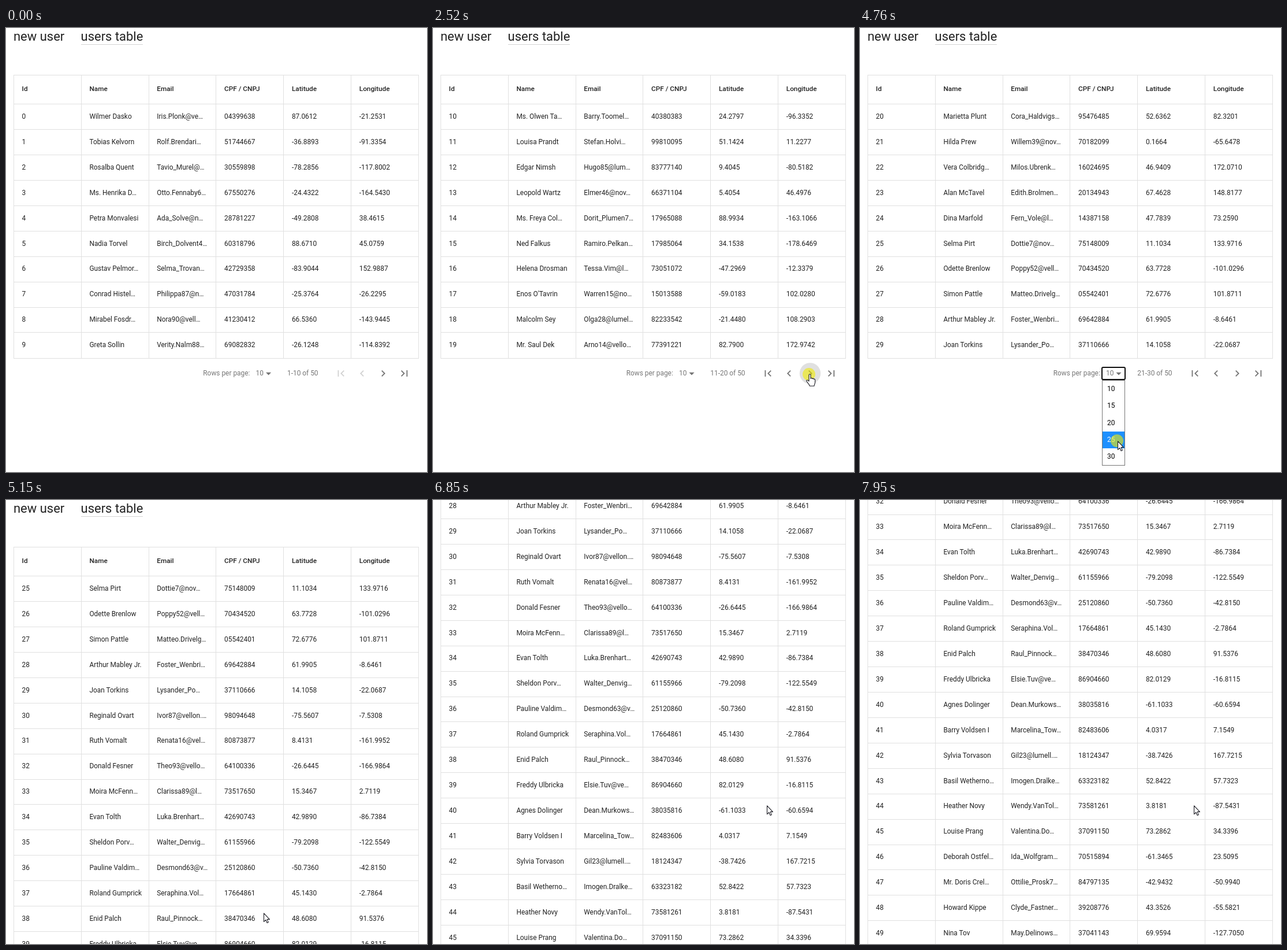
Recreate the animation shown at these times as an HTML page. Size 729 px wide and 768 px high, loop 8 s.

```html
<!DOCTYPE html>
<html lang="en">
<head>
<meta charset="utf-8">
<title>Users table</title>
<style>
html, body { margin: 0; width: 729px; height: 768px; overflow: hidden; background: #fff; }
body { position: relative; font: 11.9px Roboto, Arial, sans-serif; color: rgba(0,0,0,.87); }
div, span, svg { position: absolute; white-space: nowrap; }
svg { overflow: visible; left: 0; top: 0; }
#page { left: 0; top: 0; width: 729px; height: 1300px; }
.tab { top: 0; height: 28px; line-height: 30px; font-size: 21.96px; }
.tab.on { border-bottom: 1px solid #d4d4d4; }
.line { background: #e0e0e0; }
.head { font-weight: 500; font-size: 11.8px; }
#foot { left: 0; top: 0; color: rgba(0,0,0,.54); }
#foot span { top: 586.4px; line-height: 22px; }
#box { left: 418px; top: 586px; width: 38px; height: 19px; border: 2px solid #101010; border-radius: 3px; }
#list { left: 419px; top: 609px; width: 38px; height: 146px; border: 1px solid #767676; background: #fff; color: #000; }
#list div { left: 0; width: 30px; padding-left: 8px; height: 29.3px; line-height: 29.3px; }
#list .pick { background: #1e90ff; color: #fff; }
</style>
</head>
<body>
<div id="page">
  <div class="tab" style="left:13px">new user</div>
  <div class="tab on" style="left:129.6px">users table</div>
  <div id="tables"></div>
  <div id="foot">
    <span id="label">Rows per page:</span><span id="size">10</span>
    <span id="range" style="right:-540.5px"></span>
    <svg width="1" height="1">
      <circle id="hover" cx="653" cy="597.4" r="18.2" fill="#e0e0e0"/>
      <path id="caret" d="M7 10l5 5 5-5z" fill="#757575"/>
      <g id="icons" fill="#000"></g>
    </svg>
  </div>
  <div id="box"></div>
  <div id="list"></div>
</div>
<svg width="729" height="768">
  <circle id="disc" r="11" fill="rgba(240,235,0,.6)"/>
  <g id="cursor" fill="#fff" stroke="#1c1c24" stroke-width="1.1" stroke-linejoin="round">
    <path id="arrow" d="M.5 .8V15.4L3.8 12.3 6 17.4 8.3 16.4 6.1 11.4H10.4Z"/>
    <path id="hand" transform="translate(-6 -1)" d="M5 13V2.2C5 .2 8 .2 8 2.2V8.5C8.3 7 10.6 7.1 10.8 8.9 11.2 7.6 13.2 7.9 13.4 9.6 14 8.8 15.6 9 15.6 10.8V15C15.6 17.5 14 19 14 21.3H6.2C6 19.5 4.8 18 3.4 16.4L.8 12.8C.2 11.3 2 10.4 3.2 11.4Z"/>
  </g>
</svg>
<script>
const users = `Wilmer Dasko|Iris.Plonk@ve…|04399638|87.0612|-21.2531
Tobias Kelvorn|Rolf.Brendari…|51744667|-36.8893|-91.3354
Rosalba Quent|Tavio_Murel@…|30559898|-78.2856|-117.8002
Ms. Henrika D…|Otto.Fennaby6…|67550276|-24.4322|-164.5430
Petra Monvalesi|Ada_Solve@n…|28781227|-49.2808|38.4615
Nadia Torvel|Birch_Dolvent4…|60318796|88.6710|45.0759
Gustav Pelmor…|Selma_Trovan…|42729358|-83.9044|152.9887
Conrad Histel…|Philippa87@n…|47031784|-25.3764|-26.2295
Mirabel Fosdr…|Nora90@vell…|41230412|66.5360|-143.9445
Greta Sollin|Verity.Nalm88…|69082832|-26.1248|-114.8392
Ms. Olwen Ta…|Barry.Toomel…|40380383|24.2797|-96.3352
Louisa Prandt|Stefan.Holvi…|99810095|51.1424|11.2277
Edgar Nimsh|Hugo85@lum…|83777140|9.4045|-80.5182
Leopold Wartz|Elmer46@nov…|66371104|5.4054|46.4976
Ms. Freya Col…|Dorit_Plumen7…|17965088|88.9934|-163.1066
Ned Falkus|Ramiro.Pelkan…|17985064|34.1538|-178.6469
Helena Drosman|Tessa.Vim@l…|73051072|-47.2969|-12.3379
Enos O'Tavrin|Warren15@no…|15013588|-59.0183|102.0280
Malcolm Sey|Olga28@lumel…|82233542|-21.4480|108.2903
Mr. Saul Dek|Arno14@vello…|77391221|82.7900|172.9742
Marietta Plunt|Cora_Haldvigs…|95476485|52.6362|82.3201
Hilda Prew|Willem39@nov…|70182099|0.1664|-65.6478
Vera Colbridg…|Milos.Ubrenk…|16024695|46.9409|172.0710
Alan McTavel|Edith.Brolmen…|20134943|67.4628|148.8177
Dina Marfold|Fern_Vole@l…|14387158|47.7839|73.2590
Selma Pirt|Dottie7@nov…|75148009|11.1034|133.9716
Odette Brenlow|Poppy52@vell…|70434520|63.7728|-101.0296
Simon Pattle|Matteo.Drivelg…|05542401|72.6776|101.8711
Arthur Mabley Jr.|Foster_Wenbri…|69642884|61.9905|-8.6461
Joan Torkins|Lysander_Po…|37110666|14.1058|-22.0687
Reginald Ovart|Ivor87@vellon.…|98094648|-75.5607|-7.5308
Ruth Vomalt|Renata16@vel…|80873877|8.4131|-161.9952
Donald Fesner|Theo93@vello…|64100336|-26.6445|-166.9864
Moira McFenn…|Clarissa89@l…|73517650|15.3467|2.7119
Evan Tolth|Luka.Brenhart…|42690743|42.9890|-86.7384
Sheldon Porv…|Walter_Denvig…|61155966|-79.2098|-122.5549
Pauline Valdim…|Desmond63@v…|25120860|-50.7360|-42.8150
Roland Gumprick|Seraphina.Vol…|17664861|45.1430|-2.7864
Enid Palch|Raul_Pinnock…|38470346|48.6080|91.5376
Freddy Ulbricka|Elsie.Tuv@ve…|86904660|82.0129|-16.8115
Agnes Dolinger|Dean.Murkows…|38035816|-61.1033|-60.6594
Barry Voldsen I|Marcelina_Tow…|82483606|4.0317|7.1549
Sylvia Torvason|Gil23@lumell.…|18124347|-38.7426|167.7215
Basil Wetherno…|Imogen.Dralke…|63323182|52.8422|57.7323
Heather Novy|Wendy.VanTol…|73581261|3.8181|-87.5431
Louise Prang|Valentina.Do…|37091150|73.2862|34.3396
Deborah Ostfel…|Ida_Wolfgram…|70515894|-61.3465|23.5095
Mr. Doris Crel…|Ottilie_Prosk7…|84797135|-42.9432|-50.9940
Howard Kippe|Clyde_Fastner…|39208776|43.3526|-55.5821
Nina Tov|May.Delinows…|37041143|69.9594|-127.7050`
  .split('\n').map((row, i) => [i, ...row.split('|')]);
const titles = ['Id', 'Name', 'Email', 'CPF / CNPJ', 'Latitude', 'Longitude'];

const LOOP = 8000, LEFT = 13, TOP = 81, BODY = 131.2, ROW = 43.92, COL = 116.83, SCROLL = 91.6;
const $ = id => document.getElementById(id);
const show = (el, on) => { el.style.display = on ? '' : 'none'; };

function add(parent, css, text = '', cls = '') {
  const el = document.createElement('div');
  el.style.cssText = css;
  el.textContent = text;
  el.className = cls;
  parent.append(el);
  return el;
}

function addCells(parent, cells, top, height, cls) {
  cells.forEach((text, c) => add(parent,
    `left:${LEFT + c * COL + 14.6}px;top:${top}px;line-height:${height}px`, text, cls));
}

function makeTable(from, to) {
  const table = add($('tables'), 'left:0;top:0');
  const count = to - from, bottom = Math.round(BODY + count * ROW + .7);
  const line = (x, y, w, h) =>
    add(table, `left:${x}px;top:${y}px;width:${w}px;height:${h}px`, '', 'line');
  for (let c = 0; c <= 6; c++) line(Math.round(LEFT + c * COL - .1), TOP, 1, bottom - TOP);
  line(LEFT, TOP, 702, 1);
  addCells(table, titles, TOP, 49.6, 'head');
  for (let r = 0; r <= count; r++) {
    line(LEFT, r < count ? BODY + r * ROW : bottom, 702, 1);
    if (r < count) addCells(table, users[from + r], BODY + r * ROW + .75, ROW, '');
  }
  return table;
}

const tables = [[0, 10], [10, 20], [20, 30], [25, 50]].map(p => makeTable(...p));

const icons = [
  'M18.41 16.59L13.82 12l4.59-4.59L17 6l-6 6 6 6zM6 6h2v12H6z',
  'M15.41 7.41L14 6l-6 6 6 6 1.41-1.41L10.83 12z',
  'M10 6L8.59 7.41 13.17 12l-4.58 4.59L10 18l6-6z',
  'M5.59 7.41L10.18 12l-4.59 4.59L7 18l6-6-6-6zM16 6h2v12h-2z'
].map((d, i) => {
  const path = document.createElementNS('http://www.w3.org/2000/svg', 'path');
  path.setAttribute('d', d);
  path.setAttribute('transform', `translate(${569 + i * 36.6} 586.5) scale(.915)`);
  $('icons').append(path);
  return path;
});

const options = [10, 15, 20, 25, 30].map((n, i) => add($('list'), `top:${i * 29.3}px`, n));

// [time, page], -1 while loading
const pages = [[0, 0], [1825, -1], [1980, 1], [2675, -1], [2905, 2], [4920, -1], [5150, 3]];
const scrolls = [[0, 0], [5840, 1], [6300, 2], [6850, 3], [7400, 4], [7950, 5]];
const clicks = [[1670, 1825], [2520, 2675], [3750, 3910], [4760, 4920]];
const hovers = [[1670, 1825], [2130, 2675]];
// [start, last step, steps, x, y]
const moves = [
  [740, 1510, 11, 652, 600],
  [1670, 1670, 1, 652, 599],
  [2985, 3220, 4, 467, 587],
  [3370, 3600, 4, 456, 599],
  [4060, 4380, 5, 446, 714],
  [5320, 5610, 5, 578, 528]
];

const valueAt = (table, t) => table.filter(k => k[0] <= t).pop()[1];
const within = (spans, t) => spans.some(([a, b]) => t >= a && t < b);

function cursorAt(t) {
  let x = 674, y = 738.6;
  for (const [start, end, n, tx, ty] of moves) {
    if (t < start) break;
    const gap = (end - start) / Math.max(1, n - 1) || 1;
    const p = Math.min(n, Math.floor((t - start) / gap + 1.001)) / n;
    x += (tx - x) * p;
    y += (ty - y) * p;
  }
  return [x, y];
}

function draw(t) {
  const page = valueAt(pages, t), open = t >= 3830 && t < 4920;
  const [x, y] = cursorAt(t);
  $('page').style.top = -SCROLL * valueAt(scrolls, t) + 'px';
  tables.forEach((table, i) => show(table, i === page));

  show($('foot'), page >= 0 && page < 3);
  const shift = page > 0 ? -6.6 : 0;
  $('label').style.left = 341.3 + shift + 'px';
  $('size').style.left = 432.6 + shift + 'px';
  $('caret').setAttribute('transform', `translate(${443.6 + shift} 586.7) scale(.915)`);
  $('range').textContent = `${page * 10 + 1}-${page * 10 + 10} of 50`;
  icons.forEach((icon, i) => icon.setAttribute('opacity', page === 0 && i < 2 ? .18 : .54));
  show($('hover'), within(hovers, t));

  show($('box'), open);
  show($('list'), open);
  const pick = Math.max(0, Math.floor((y - 610) / 29.3));
  options.forEach((el, i) => { el.className = i === pick ? 'pick' : ''; });

  const onNext = Math.hypot(x - 653, y - 597.4) < 18;
  const onSelect = x > 418 && x < 460 && y > 586 && y < 609;
  const hand = page >= 0 && page < 3 && (onNext || onSelect);
  show($('cursor'), t >= 740);
  show($('hand'), hand);
  show($('arrow'), !hand);
  $('cursor').setAttribute('transform', `translate(${Math.round(x)} ${Math.round(y)})`);
  show($('disc'), within(clicks, t));
  $('disc').setAttribute('cx', x - 1);
  $('disc').setAttribute('cy', y);
}

const begin = performance.now();
function tick() {
  draw((performance.now() - begin) % LOOP);
  requestAnimationFrame(tick);
}
tick();
</script>
</body>
</html>
```
